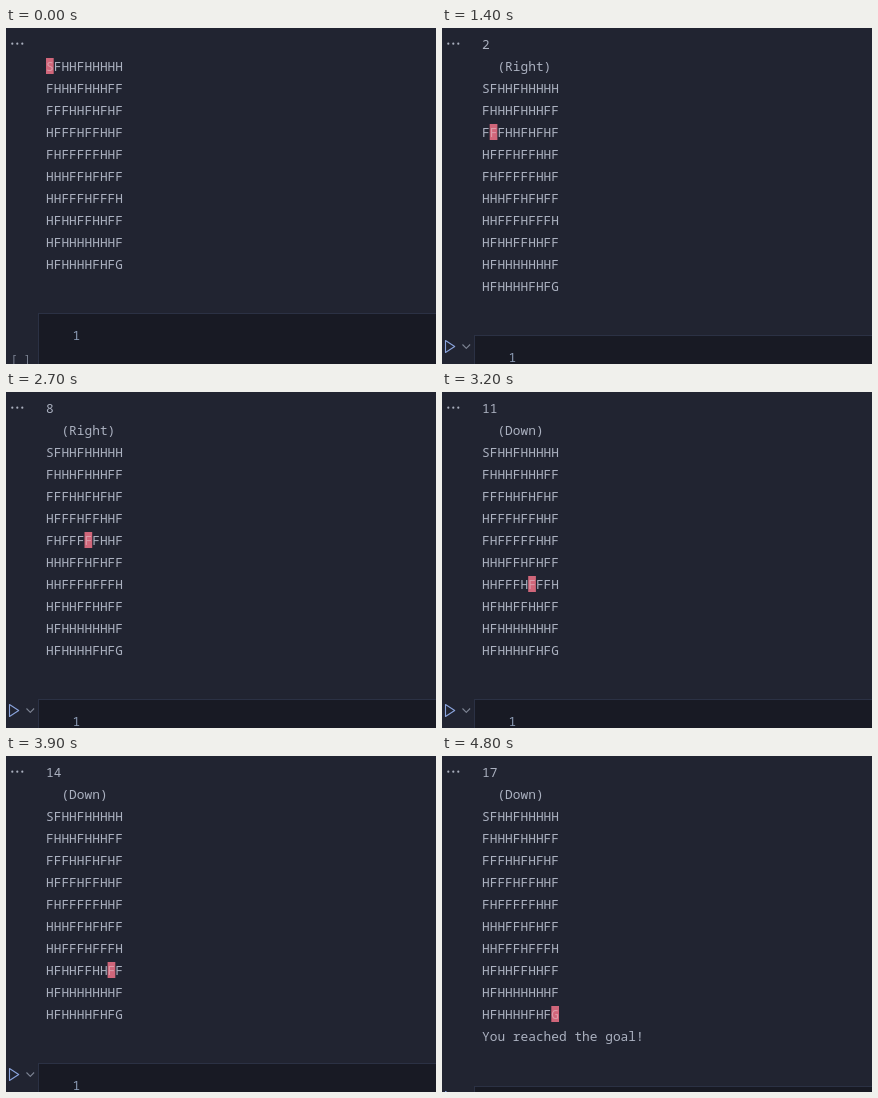
These frames come from a looping animation (430x336 px, 5100 ms). An HTML page with a canvas:

```html
<!DOCTYPE html>
<html lang="en">
<head>
<meta charset="utf-8">
<title>Grid walk</title>
<style>
html, body { margin: 0; width: 100%; height: 100%; overflow: hidden; background: #212431; }
canvas { display: block; }
</style>
</head>
<body>
<canvas id="stage" width="430" height="336"></canvas>
<script>
const ctx = document.getElementById('stage').getContext('2d');
const LOOP = 5100, TICK = 100;
const FIRST = 895, PERIOD = 205, DONE = 4600;
const LEFT = 40, ADVANCE = 7.7, LINE = 22, BASE = 21;
const MOVES = 'DDRRDRDRRRDDRRDRDD';
const MAP = [
  'SFHHFHHHHH', 'FHHHFHHHFF', 'FFFHHFHFHF', 'HFFFHFFHHF', 'FHFFFFFHHF',
  'HHHFFHFHFF', 'HHFFFHFFFH', 'HFHHFFHHFF', 'HFHHHHHHHF', 'HFHHHHFHFG'
];
const COLOR = {
  page: '#212431', editor: '#181a24', border: '#2b3144', text: '#abb1c0',
  mark: '#d0667a', marked: '#dc9aa8', number: '#8b9bb4',
  play: '#8aa3dc', dim: '#7d8493', dots: '#a9afbd'
};

// Fixed advance keeps every column on the terminal grid.
function print(text, x, y, color = COLOR.text, size = 12.83, advance = ADVANCE) {
  ctx.font = `${size}px "Noto Sans Mono", "DejaVu Sans Mono", monospace`;
  ctx.fillStyle = color;
  [...text].forEach((ch, i) => ctx.fillText(ch, x + i * advance, y));
}

function stroke(points, color, closed) {
  ctx.beginPath();
  points.forEach(([x, y]) => ctx.lineTo(x, y));
  if (closed) ctx.closePath();
  ctx.strokeStyle = color;
  ctx.lineWidth = 1.1;
  ctx.lineJoin = 'round';
  ctx.stroke();
}

function drawDots() {
  ctx.fillStyle = COLOR.dots;
  for (let i = 0; i < 3; i++) {
    ctx.beginPath();
    ctx.arc(6.3 + i * 5, 15.7, 1.1, 0, Math.PI * 2);
    ctx.fill();
  }
}

function drawMap(top, row, col) {
  MAP.forEach((line, r) => print(line, LEFT, top + r * LINE));
  const x = LEFT + col * ADVANCE, y = top + row * LINE;
  ctx.fillStyle = COLOR.mark;
  ctx.fillRect(x, y - 13, ADVANCE, 16);
  print(MAP[row][col], x, y, COLOR.marked);
}

function drawCell(top, hovered) {
  ctx.fillStyle = COLOR.border;
  ctx.fillRect(32, top, 398, 336 - top);
  ctx.fillStyle = COLOR.editor;
  ctx.fillRect(33, top + 1, 397, 336 - top);
  print('1', 66.5, top + 26.5, COLOR.number);
  if (hovered) {
    stroke([[3.5, top + 5.5], [12.7, top + 11.5], [3.5, top + 17.5]], COLOR.play, true);
    stroke([[20.5, top + 9.5], [24.3, top + 13.3], [28.1, top + 9.5]], COLOR.dim);
  } else {
    print('[ ]', 4.7, top + 49.5, COLOR.dim, 11, 6.6);
  }
}

function draw(time) {
  const t = Math.floor(time / TICK) * TICK;
  const step = Math.min(Math.floor((t - FIRST) / PERIOD), MOVES.length - 1);
  const started = step >= 0, done = t >= DONE;
  const path = started ? MOVES.slice(0, step + 1) : '';
  const row = path.split('D').length - 1;
  const col = path.length - row;

  ctx.fillStyle = COLOR.page;
  ctx.fillRect(0, 0, 430, 336);
  drawDots();
  if (started) {
    print(String(step), LEFT, BASE);
    print(MOVES[step] === 'D' ? '  (Down)' : '  (Right)', LEFT, BASE + LINE);
  }
  drawMap(BASE + LINE * (started ? 2 : 1), row, col);
  if (done) print('You reached the goal!', LEFT, BASE + LINE * 12);
  drawCell(done ? 330 : started ? 307 : 285, started);
}

const begin = performance.now();
function frame() {
  draw((performance.now() - begin) % LOOP);
  requestAnimationFrame(frame);
}
frame();
</script>
</body>
</html>
```
